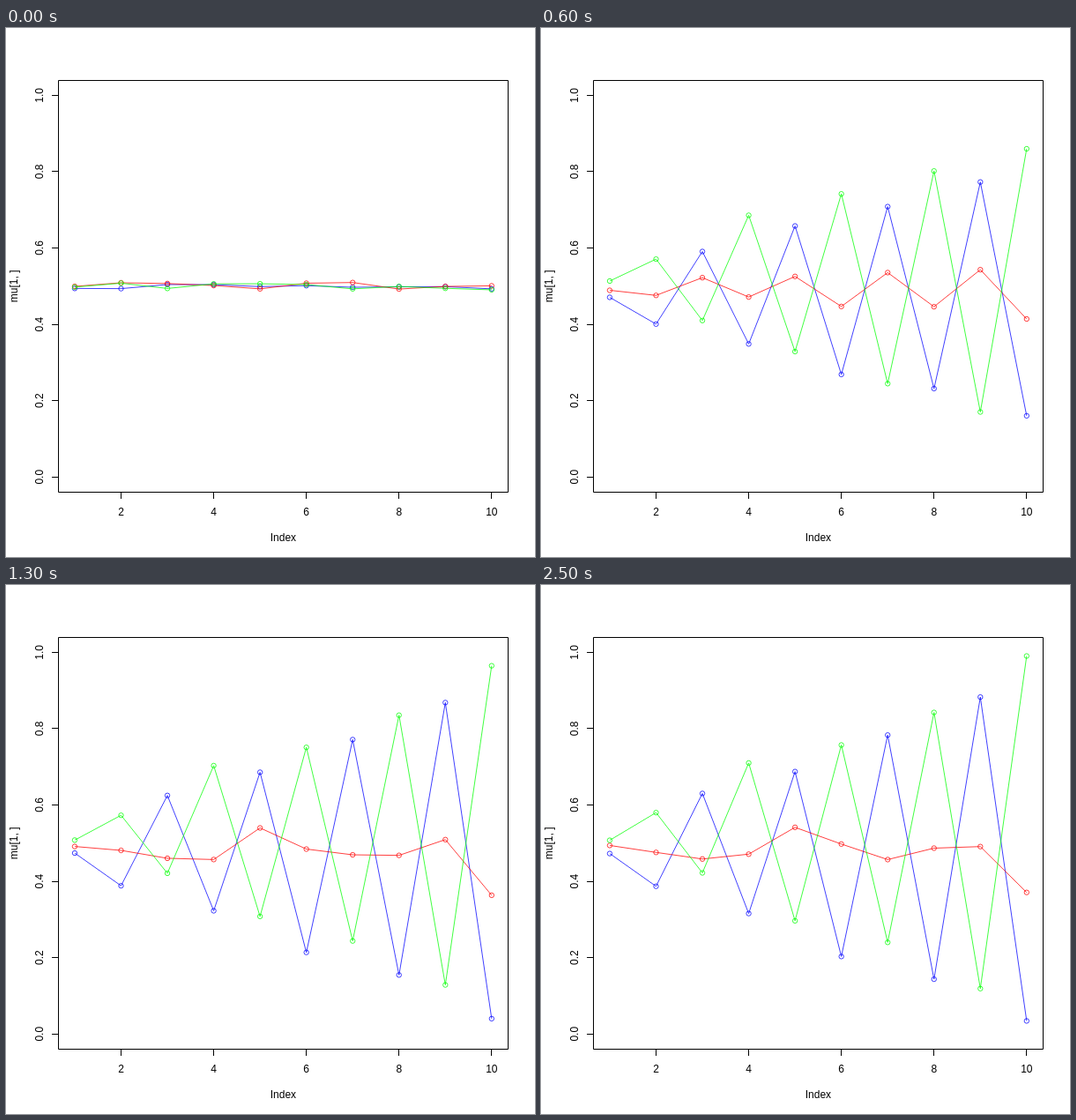
Animation of 600 by 600 pixels, one loop 2600 ms. Source, as an HTML page with a canvas:

```html
<!DOCTYPE html>
<html lang="en">
<head>
<meta charset="utf-8">
<title>Bernoulli mixture fitted by EM</title>
<style>
html, body { margin: 0; width: 100%; height: 100%; overflow: hidden; background: #fff; }
canvas { display: block; }
</style>
</head>
<body>
<canvas id="plot" width="600" height="600"></canvas>
<script>
const ROWS = 1000, DIMS = 10, STEPS = 26, STEP_MS = 100;
const COLORS = ['#00f', '#f00', '#0f0'];
const range = n => [...Array(n).keys()];
const sum = list => list.reduce((a, b) => a + b, 0);

// Mersenne Twister, seeded the way R's set.seed() does it
function makeRandom(seed) {
  const N = 624, state = new Uint32Array(N);
  const scramble = () => seed = (Math.imul(69069, seed) + 1) >>> 0;
  for (let i = 0; i < 51; i++) scramble();
  for (let i = 0; i < N; i++) state[i] = scramble();
  let pos = N;
  return () => {
    if (pos === N) {
      for (let i = 0; i < N; i++) {
        const y = (state[i] & 0x80000000) | (state[(i + 1) % N] & 0x7fffffff);
        state[i] = state[(i + 397) % N] ^ (y >>> 1) ^ (y & 1 ? 0x9908b0df : 0);
      }
      pos = 0;
    }
    let y = state[pos++];
    y ^= y >>> 11;
    y ^= (y << 7) & 0x9d2c5680;
    y ^= (y << 15) & 0xefc60000;
    y ^= y >>> 18;
    return (y >>> 0) * 2.3283064365386963e-10;
  };
}

const random = makeRandom(1234567890);

function bernoulli(p) {
  if (p === 0 || p === 1) return p;
  const u = random();
  return p > 0.5 ? +(u < p) : +(u >= 1 - p);
}

// Two mirrored zigzags that widen with the index, and a flat component
const zigzag = [0.5, 0.6, 0.4, 0.7, 0.3, 0.8, 0.2, 0.9, 0.1, 1];
const truth = [zigzag, zigzag.map(p => Math.round(10 - 10 * p) / 10), zigzag.map(() => 0.5)];

function drawSample() {
  const u = random();
  const k = u <= 1 / 3 ? 1 : u <= 2 / 3 ? 2 : 0;
  return truth[k].map(bernoulli);
}

const nearHalf = () => 0.49 + 0.02 * random();

function fit() {
  const data = range(ROWS).map(drawSample);
  let weight = range(3).map(nearHalf);
  weight = weight.map(w => w / sum(weight));
  let mu = range(3).map(() => range(DIMS).map(nearHalf));
  const history = [mu];
  while (history.length < STEPS) {
    const total = [0, 0, 0];
    const hits = range(3).map(() => Array(DIMS).fill(0));
    for (const row of data) {
      const like = mu.map((m, k) => row.reduce((p, x, d) => p * (x ? m[d] : 1 - m[d]), weight[k]));
      const all = sum(like);
      like.forEach((p, k) => {
        total[k] += p / all;
        row.forEach((x, d) => hits[k][d] += x * p / all);
      });
    }
    weight = total.map(t => t / ROWS);
    mu = hits.map((h, k) => h.map(v => v / total[k]));
    history.push(mu);
  }
  return history;
}

const history = fit();
const ctx = document.getElementById('plot').getContext('2d');
const px = i => 77.956 + 52.543 * (i - 1);
const py = v => 509.244 - 432.889 * v;

function label(text, x, y, turned) {
  ctx.save();
  ctx.translate(x, y);
  if (turned) ctx.rotate(-Math.PI / 2);
  ctx.fillText(text, 0, 0);
  ctx.restore();
}

function drawAxes() {
  ctx.fillStyle = ctx.strokeStyle = '#000';
  ctx.font = '12px "Liberation Sans", Arial, sans-serif';
  ctx.textAlign = 'center';
  ctx.lineWidth = 1;
  ctx.strokeRect(59.5, 59.5, 510, 467);
  for (let i = 2; i <= 10; i += 2) {
    ctx.fillRect(Math.floor(px(i)), 527, 1, 7);
    label(i, px(i), 553);
  }
  for (let i = 0; i <= 5; i++) {
    const y = py(i / 5);
    ctx.fillRect(52, Math.floor(y), 7, 1);
    label((i / 5).toFixed(1), 42, y, true);
  }
  label('Index', 314.4, 582);
  label('mu[1, ]', 13, 292.8, true);
}

function drawSeries(values, color) {
  ctx.strokeStyle = color;
  ctx.lineWidth = 0.75;
  ctx.lineJoin = 'round';
  ctx.beginPath();
  values.forEach((v, i) => ctx.lineTo(px(i + 1), py(v)));
  ctx.stroke();
  values.forEach((v, i) => {
    ctx.beginPath();
    ctx.arc(px(i + 1), py(v), 2.7, 0, 2 * Math.PI);
    ctx.stroke();
  });
}

function render() {
  const step = Math.floor(performance.now() / STEP_MS) % STEPS;
  ctx.fillStyle = '#fff';
  ctx.fillRect(0, 0, 600, 600);
  drawAxes();
  history[step].forEach((values, k) => drawSeries(values, COLORS[k]));
  requestAnimationFrame(render);
}
render();
</script>
</body>
</html>
```
